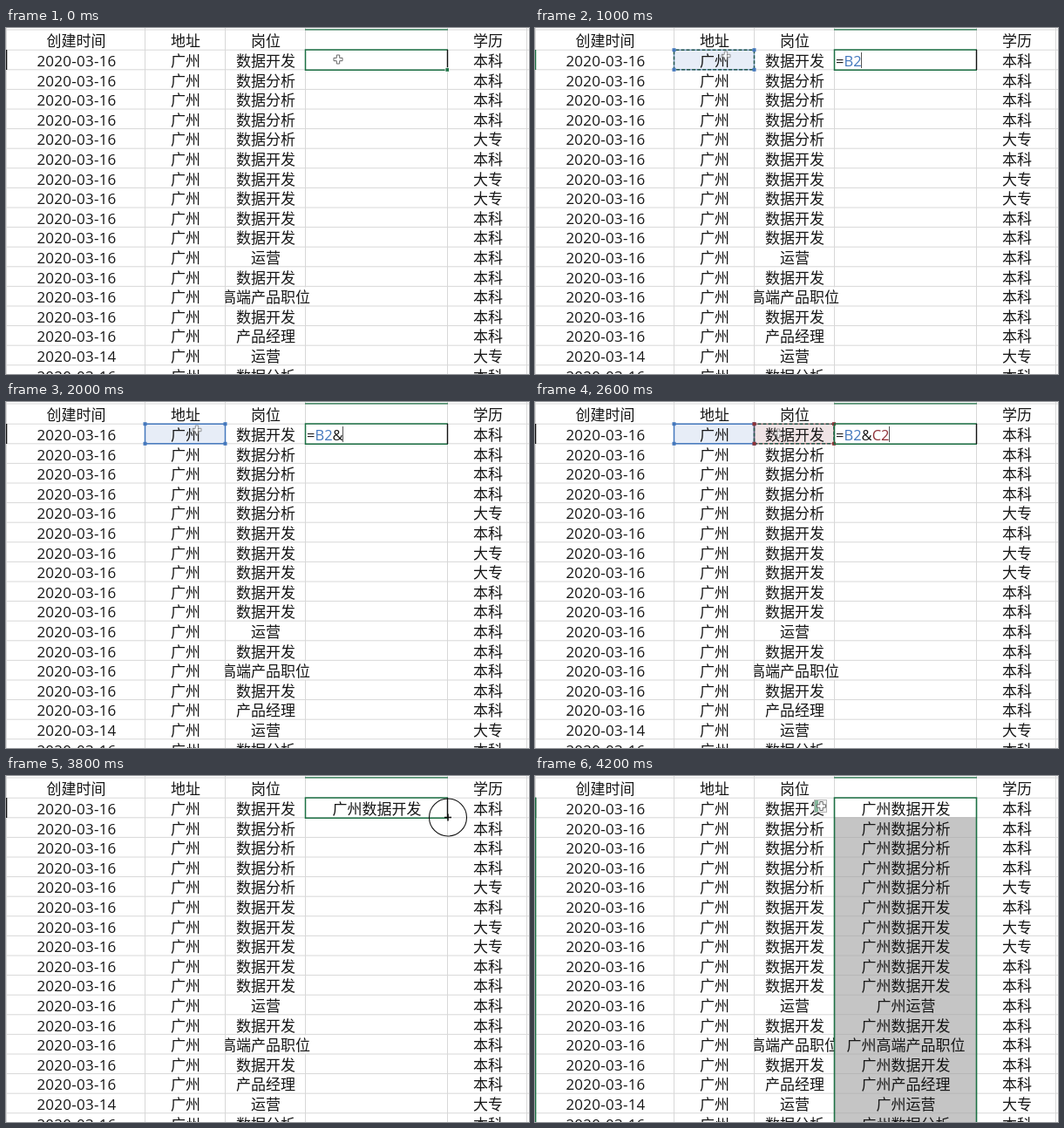
An HTML page for the animation above (4.3 s loop, 600 by 397 pixels).

```html
<!DOCTYPE html>
<html lang="zh-CN">
<head>
<meta charset="utf-8">
<title>Joining cells with &amp;</title>
<style>
  html, body { margin: 0; width: 100%; height: 100%; overflow: hidden; background: #fff; }
  svg { display: block; width: 600px; height: 397px; }
  text { font: 17px "Noto Sans CJK SC", "Noto Sans CJK", "Noto Sans", sans-serif; fill: #161616; }
  .mid { text-anchor: middle; }
  .date { font-family: "Open Sans", "Noto Sans", sans-serif; letter-spacing: .25px; }
  #formula { font: 16.5px "Open Sans", "Noto Sans", sans-serif; }
  .grid { stroke: #d8d8d8; }
  .green { stroke: #1d7044; fill: none; }
  .blue { stroke: #4478bd; fill: #4478bd; }
  .red { stroke: #8f3238; fill: #8f3238; }
  .tint { fill-opacity: .13; stroke: none; }
  .edge { fill: none; stroke-width: 1.5; }
  .ants { fill: none; stroke: #24584c; stroke-width: 1.5; stroke-dasharray: 4 2; }
  .knob { stroke: none; }
  tspan.blue, tspan.red { stroke: none; }
</style>
</head>
<body>
<svg viewBox="0 0 600 397">
  <defs>
    <clipPath id="jobClip"><rect x="251.5" width="349" height="397"/></clipPath>
    <path id="plus" d="M-1.7-5h3.4v3.3H5v3.4H1.7V5h-3.4V1.7H-5v-3.4h3.3z" fill="#fff" stroke="#666"/>
  </defs>
  <g id="lines" class="grid"></g>
  <g id="refB"></g>
  <g id="refC"></g>
  <g id="sheet"></g>
  <g id="antsB"></g>
  <g id="antsC"></g>

  <path class="green" d="M343 1.9H507" stroke-width="1.2"/>
  <path id="rowMark" d="M.5 25V48" stroke="#111" stroke-width="1.6"/>
  <g id="cell">
    <path class="green" d="M507 25H343.5V48.2H507" stroke-width="1.5"/>
    <path d="M506.5 25V48" stroke="#111" stroke-width="1.4"/>
    <rect id="handle" x="504" y="45.7" width="4.5" height="4.5" fill="#1d7044" stroke="#fff" stroke-width=".8"/>
  </g>
  <text id="joined" class="mid" x="425.5" y="44"></text>
  <text id="formula" x="345" y="43.6"><tspan id="eq">=</tspan><tspan id="tB" class="blue">B2</tspan><tspan id="amp">&amp;</tspan><tspan id="tC" class="red">C2</tspan></text>
  <path id="caret" d="M0 28V46" stroke="#555"/>

  <g id="filled">
    <rect x="344" y="48" width="162" height="349" fill="#c5c5c5"/>
    <g id="fillRows"></g>
    <path class="green" d="M343.5 397V25H506.5V397" stroke-width="1.6"/>
    <path class="green" d="M.6 24.5V397" stroke-width="1.6"/>
    <rect x="320.5" y="27.5" width="14" height="14" fill="#f1f1f1" stroke="#b5b5b5"/>
    <rect x="321" y="28" width="4" height="13" fill="#86b79c"/>
  </g>
  <use id="pointer" href="#plus"/>
  <g id="click" fill="none" stroke="#111">
    <path d="M503 47.5h8M507 43.5v8" stroke-width="1.6"/>
    <circle id="ring" cx="507" cy="47.5" r="21.5" stroke-width="1.1"/>
  </g>
</svg>
<script>
const LOOP = 4300, PITCH = 22.6;
const $ = id => document.getElementById(id);

function add(parent, tag, attrs, text) {
  const el = document.createElementNS('http://www.w3.org/2000/svg', tag);
  for (const k in attrs) el.setAttribute(k, attrs[k]);
  if (text) el.textContent = text;
  return $(parent).appendChild(el);
}
const label = (parent, x, y, text, more) =>
  add(parent, 'text', { x, y, class: 'mid', ...more }, text);

// One letter per row
const jobs = { k: '数据开发', f: '数据分析', y: '运营', g: '高端产品职位', c: '产品经理' };
const jobRows = 'kffffkkkkkykgkcyf', degreeRows = 'bbbbdbddbbbbbbbdb';

const rowTop = i => 25.2 + PITCH * i;
for (const x of [0, 159, 251, 343, 506, 597])
  add('lines', 'path', { d: `M${x + .5} 0V397` });
add('lines', 'path', { d: 'M0 2H600' });
for (let i = 0; i < 17; i++)
  add('lines', 'path', { d: `M0 ${rowTop(i)}H600` });

[['创建时间', 80.5], ['地址', 206], ['岗位', 298], ['学历', 553]]
  .forEach(([text, x]) => label('sheet', x, 21.3, text));

[...jobRows].forEach((key, i) => {
  const y = 44 + PITCH * i, job = jobs[key];
  label('sheet', 81, y, i === 15 ? '2020-03-14' : '2020-03-16', { class: 'mid date' });
  label('sheet', 206, y, '广州');
  if (key === 'g')
    add('sheet', 'rect', { x: 342, y: rowTop(i) + 1, width: 3, height: 21, fill: '#fff' });
  label('sheet', 298, y, job, { 'clip-path': 'url(#jobClip)' });
  label('sheet', 553, y, degreeRows[i] === 'd' ? '大专' : '本科');
  if (i) {
    add('fillRows', 'path', { d: `M344 ${rowTop(i)}H506`, stroke: '#b7b7b7' });
    label('fillRows', 425.5, y, '广州' + job);
  }
});
$('joined').textContent = '广州' + jobs.k;

// Referenced cell: tint, outline, corner knobs, moving dashes
function reference(col, color, x, width) {
  const box = { x, y: 25.2, width, height: 22.6 };
  add('ref' + col, 'rect', { ...box, class: color + ' tint' });
  const edge = add('ants' + col, 'rect', { ...box, class: color + ' edge' });
  const ants = add('ants' + col, 'rect', { ...box, class: 'ants' });
  for (const cx of [x, x + width]) for (const cy of [25.2, 47.8])
    add('ants' + col, 'rect', { x: cx - 2, y: cy - 2, width: 4, height: 4, class: color + ' knob' });
  return { edge, ants };
}
const refB = reference('B', 'blue', 159.5, 92);
const refC = reference('C', 'red', 251.5, 91.5);

// Times during which each part shows, in ms
const spans = {
  cell: [[0, 3900]],
  handle: [[0, 300], [2900, 3700]],
  formula: [[500, 2900]],
  caret: [[300, 2900]],
  tB: [[900, 2900]], refB: [[900, 2900]], antsB: [[900, 2900]],
  amp: [[1500, 2900]],
  tC: [[2500, 2900]], refC: [[2500, 2900]], antsC: [[2500, 2900]],
  joined: [[2900, LOOP]],
  filled: [[3900, LOOP]],
  pointer: [[0, 300], [600, 3700], [3900, LOOP]],
  click: [[3700, 3900]],
  ring: [[3800, 3900]]
};
const carets = [[300, 425.5], [500, 354.5], [900, 374.5], [1500, 386.5], [2500, 406.5]];
const path = [
  [0, 381, 36], [600, 381, 36], [900, 219, 32], [2300, 219, 32], [2500, 279, 36],
  [2900, 279, 36], [3200, 483.5, 35.5], [3500, 483.5, 35.5], [3700, 507, 47],
  [3900, 507, 47], [4000, 328.5, 34.5], [LOOP, 328.5, 34.5]
];

function pointerAt(t) {
  const i = path.findIndex(p => p[0] > t);
  const [t0, x0, y0] = path[i - 1], [t1, x1, y1] = path[i];
  const u = (t - t0) / (t1 - t0), k = u * u * (3 - 2 * u);
  return [x0 + (x1 - x0) * k, y0 + (y1 - y0) * k];
}

function show(el, on) { el.style.display = on ? '' : 'none'; }

function march({ edge, ants }, t, moving) {
  show(ants, moving);
  edge.setAttribute('opacity', moving ? .5 : 1);
  ants.setAttribute('stroke-dashoffset', -t / 50 % 6);
}

function draw(now) {
  const t = Math.floor(now % LOOP / 100) * 100;
  for (const id in spans) show($(id), spans[id].some(([a, b]) => t >= a && t < b));
  const caret = carets.filter(c => c[0] <= t).pop();
  if (caret) $('caret').setAttribute('transform', `translate(${caret[1]})`);
  $('pointer').setAttribute('transform', `translate(${pointerAt(t)})`);
  $('pointer').setAttribute('opacity', t >= 900 && t < 2900 ? .65 : 1);
  $('rowMark').setAttribute('stroke', t >= 900 && t < 1500 ? '#1d7044' : '#111');
  march(refB, t, t < 1500);
  march(refC, t, true);
}

const start = performance.now();
function tick() {
  draw(performance.now() - start);
  requestAnimationFrame(tick);
}
tick();
</script>
</body>
</html>
```
